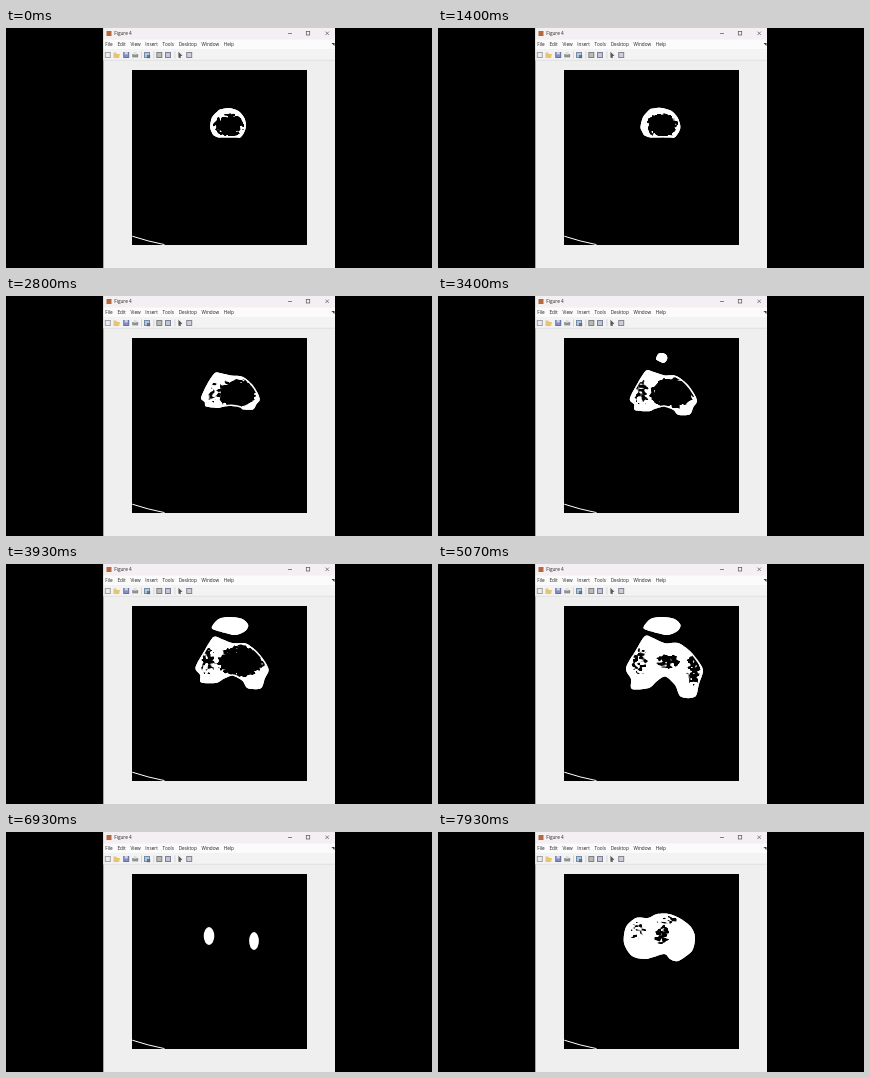
Animation, 426 px wide and 240 px high, one loop 8 s. Source, as an HTML page with a canvas:

```html
<!DOCTYPE html>
<html lang="en">
<head>
<meta charset="utf-8">
<title>Figure 4</title>
<style>
html, body { margin: 0; width: 100%; height: 100%; overflow: hidden; background: #000; }
canvas { display: block; width: 426px; height: 240px; }
</style>
</head>
<body>
<canvas id="stage" width="426" height="240"></canvas>
<script>
const ctx = document.getElementById('stage').getContext('2d');
const LOOP = 8000, FPS = 15, FRAMES = LOOP * FPS / 1000;

const lerp = (a, b, k) => a + (b - a) * k;
const clamp = v => Math.max(0, Math.min(1, v));
const ease = (t, from, to) => {
  const k = clamp((t - from) / (to - from));
  return k * k * (3 - 2 * k);
};

function pairs(list) {
  const out = [];
  for (let i = 0; i < list.length; i += 2) out.push([list[i], list[i + 1]]);
  return out;
}

// Key points, clockwise from the upper left
const DIP = 2, NOTCH = 11;
const femur = pairs([
  207,72, 215,74, 227,79, 240,79, 252,87, 261,98, 265,107, 261,120, 257,133,
  243,133, 237,121, 227,113, 218,118, 211,124, 194,125, 193,115, 188,104, 198,86]);
const tibia = pairs([
  198,86, 210,86, 219,82, 231,82, 243,87, 253,95, 257,105, 254,119,
  240,129, 232,127, 226,122, 208,127, 194,124, 186,111, 188,95]);
const patella = pairs([-18,2, -11,-7, 0,-9, 13,-7, 19,-1, 16,5, 6,9, -8,6]);

// The shaft is a dome with a flat base that widens into the femur.
function femurOutline(t) {
  const grow = ease(t, 600, 4700);
  const drop = ease(t, 1200, 5200) ** 1.7;
  const pinch = ease(t, 4900, 6400);
  return femur.map(([x, y], i) => {
    const a = Math.atan2(y - 100, x - 226);
    const domeX = 222 + 18 * Math.cos(a);
    const domeY = Math.min(97 + 17 * Math.sin(a), 109.5);
    const shift = i === DIP ? 9 : i === NOTCH ? -16 : y < 100 ? 3 : 0;
    return [lerp(domeX, x, grow), lerp(domeY, y, y > 110 ? drop : grow) + shift * pinch];
  });
}

const patch = (x, y, rx, ry, density) => ({ x, y, rx, ry, density });

function femurMarrow(t) {
  const grow = ease(t, 600, 4300);
  const shrink = ease(t, 4000, 5000);
  const fade = ease(t, 5000, 6000);
  return [
    patch(lerp(lerp(222.5, 235, grow), 229, shrink), 97,
      lerp(lerp(14, 23, grow), 14, shrink), lerp(lerp(11, 15.5, grow), 8, shrink),
      lerp(1.1, .55, shrink) - 2 * fade),
    patch(lerp(216, 201, grow), 96, 9, lerp(9, 17, grow), lerp(-.3, .3, grow) - .5 * fade),
    patch(255, 104, 8, 20, lerp(-.6, .45, shrink))
  ];
}

const tibiaMarrow = [
  patch(199, 97, 10, 13, .1), patch(224, 102, 9, 12, .45), patch(228, 88, 14, 5, .2)];

// Closed Catmull-Rom curve
function curve(pts) {
  const path = new Path2D(), n = pts.length, at = i => pts[(i + n) % n];
  path.moveTo(...pts[0]);
  for (let i = 0; i < n; i++) {
    const [a, b, c, d] = [at(i - 1), at(i), at(i + 1), at(i + 2)];
    path.bezierCurveTo(
      b[0] + (c[0] - a[0]) / 7, b[1] + (c[1] - a[1]) / 7,
      c[0] - (d[0] - b[0]) / 7, c[1] - (d[1] - b[1]) / 7, c[0], c[1]);
  }
  path.closePath();
  return path;
}

function hash(x, y, z) {
  let h = Math.imul(x, 374761393) ^ Math.imul(y, 668265263) ^ Math.imul(z, 1274126177);
  h = Math.imul(h ^ (h >>> 13), 1103515245);
  return ((h ^ (h >>> 16)) >>> 0) / 4294967296;
}

function noise(x, y, z) {
  const i = Math.floor(x), j = Math.floor(y), k = Math.floor(z);
  const layer = m => lerp(
    lerp(hash(i, j, m), hash(i + 1, j, m), x - i),
    lerp(hash(i, j + 1, m), hash(i + 1, j + 1, m), x - i), y - j);
  return lerp(layer(k), layer(k + 1), z - k);
}

const AREA = { x: 184, y: 50, w: 86, h: 88 };
const grain = document.createElement('canvas');
grain.width = AREA.w;
grain.height = AREA.h;
const gctx = grain.getContext('2d');
const pixels = gctx.createImageData(AREA.w, AREA.h);

function paintMarrow(patches, z) {
  for (let y = 0; y < AREA.h; y++) {
    for (let x = 0; x < AREA.w; x++) {
      const depth = Math.max(...patches.map(p => {
        const r2 = ((x + AREA.x - p.x) / p.rx) ** 2 + ((y + AREA.y - p.y) / p.ry) ** 2;
        return p.density - r2 * r2;
      }));
      const n = depth > -.9 ? noise(x / 2.3, y / 1.9, z) : 0;
      pixels.data[(y * AREA.w + x) * 4 + 3] = 255 * clamp((depth + (n - .5) * 1.7 - .15) * 4 + .5);
    }
  }
  gctx.putImageData(pixels, 0, 0);
}

function drawBone(pts, patches, z) {
  const path = curve(pts);
  paintMarrow(patches, z);
  ctx.fillStyle = ctx.strokeStyle = '#fff';
  ctx.fill(path);
  ctx.save();
  ctx.clip(path);
  ctx.drawImage(grain, AREA.x, AREA.y);
  ctx.lineWidth = 3;
  ctx.stroke(path);
  ctx.restore();
}

function oval(x, y, rx, ry, size) {
  ctx.fillStyle = '#fff';
  ctx.beginPath();
  ctx.ellipse(x, y, rx * size, ry * size, 0, 0, 2 * Math.PI);
  ctx.fill();
}

function drawSlice(t, z) {
  if (t < 6400) {
    drawBone(femurOutline(t), femurMarrow(t), z);
  } else if (t < 7400) {
    const size = 1 - .6 * Math.sin(Math.PI * (t - 6400) / 1000) ** 2;
    oval(203, 104, 13, 22, size);
    oval(248, 109, 12, 22, size);
  } else {
    const size = lerp(.93, 1, ease(t, 7400, 7900));
    const pts = tibia.map(([x, y]) => [lerp(222, x, size), lerp(105, y, size)]);
    drawBone(pts, tibiaMarrow, z);
  }

  const cap = ease(t, 3050, 4000) * (1 - ease(t, 5400, 6700));
  if (cap > 0) {
    const pts = patella.map(([x, y]) => [223.5 + x * cap, 62 + y * Math.sqrt(cap)]);
    drawBone(pts, [patch(223, 68, 13, 3, lerp(-1, -.1, ease(t, 4800, 5900)))], z);
  }
  oval(193, 128, 2.6, 1.5, clamp(1 - Math.abs(t - 5870) / 300));
}

function rect(color, x, y, w, h) {
  ctx.fillStyle = color;
  ctx.fillRect(x, y, w, h);
}

function line(color, ...xy) {
  ctx.strokeStyle = color;
  ctx.lineWidth = .7;
  ctx.beginPath();
  pairs(xy).forEach(p => ctx.lineTo(...p));
  ctx.stroke();
}

function shape(color, ...xy) {
  ctx.fillStyle = color;
  ctx.fill(new Path2D('M' + xy.join(' ') + 'Z'));
}

function icon(x, edge, fill) {
  rect(edge, x, 24, 6, 6);
  rect(fill, x + 1, 25, 4, 4);
}

function drawToolbar() {
  ctx.globalAlpha = .8;
  icon(98.8, '#8a8f98', '#fff');
  shape('#e3b94f', 107.5, 24.5, 110, 24.5, 111, 26, 114, 26, 113, 30, 107.5, 30);
  icon(117.2, '#44518f', '#8d99cc');
  rect('#e4e8f5', 118.6, 24, 3.2, 2.4);
  rect('#777', 126.2, 26, 6, 3.4);
  rect('#ddd', 127.4, 24, 3.4, 2.8);
  [135, 147.5, 168.5].forEach(x => rect('#c4c4c4', x, 23.5, .8, 7));
  icon(138, '#58728f', '#b9d5ea');
  rect('#52667c', 141, 27, 3.2, 3.2);
  icon(150.3, '#666', '#c8c8c8');
  icon(159, '#5d6384', '#d5d7e4');
  shape('#333', 172.4, 23.7, 172.4, 29.4, 174.8, 30.2, 174.7, 27.9, 176.5, 27.8);
  icon(180.2, '#666b78', '#e0e3ea');
  ctx.globalAlpha = 1;
}

function drawWindow() {
  rect('#000', 0, 0, 426, 240);
  rect('#efefef', 97.3, 0, 231.7, 240);
  rect('#f4eff3', 97.3, 0, 231.7, 11.5);
  rect('#fbfbfb', 97.3, 11.5, 231.7, 9.7);
  rect('#f3f3f3', 97.3, 21.2, 231.7, 10.8);
  rect('#dadada', 97.3, 31.8, 231.7, .7);

  rect('#b8683c', 100.5, 3, 5, 5);
  ctx.fillStyle = '#222';
  ctx.font = '4.7px "Open Sans", sans-serif';
  ctx.fillText('Figure 4', 108.3, 7.2);
  let x = 99.3;
  for (const name of ['File', 'Edit', 'View', 'Insert', 'Tools', 'Desktop', 'Window', 'Help']) {
    ctx.fillText(name, x, 18.2);
    x += ctx.measureText(name).width + 4.7;
  }

  line('#555', 282, 5.5, 286, 5.5);
  ctx.strokeRect(300.3, 3.6, 3.4, 3.4);
  line('#555', 319.5, 3.6, 322.9, 7);
  line('#555', 322.9, 3.6, 319.5, 7);
  shape('#333', 325.5, 15, 328.5, 15, 328.5, 18);
  drawToolbar();

  rect('#000', 126, 42, 175, 175);
  ctx.strokeStyle = '#fff';
  ctx.lineWidth = 1;
  ctx.beginPath();
  ctx.moveTo(126.3, 208.2);
  ctx.quadraticCurveTo(142, 213.4, 158.5, 216.6);
  ctx.stroke();
}

function draw() {
  const frame = Math.floor((performance.now() % LOOP + 4) * FPS / 1000) % FRAMES;
  drawWindow();
  drawSlice(frame * 1000 / FPS, frame * .3);
  requestAnimationFrame(draw);
}
draw();
</script>
</body>
</html>
```
